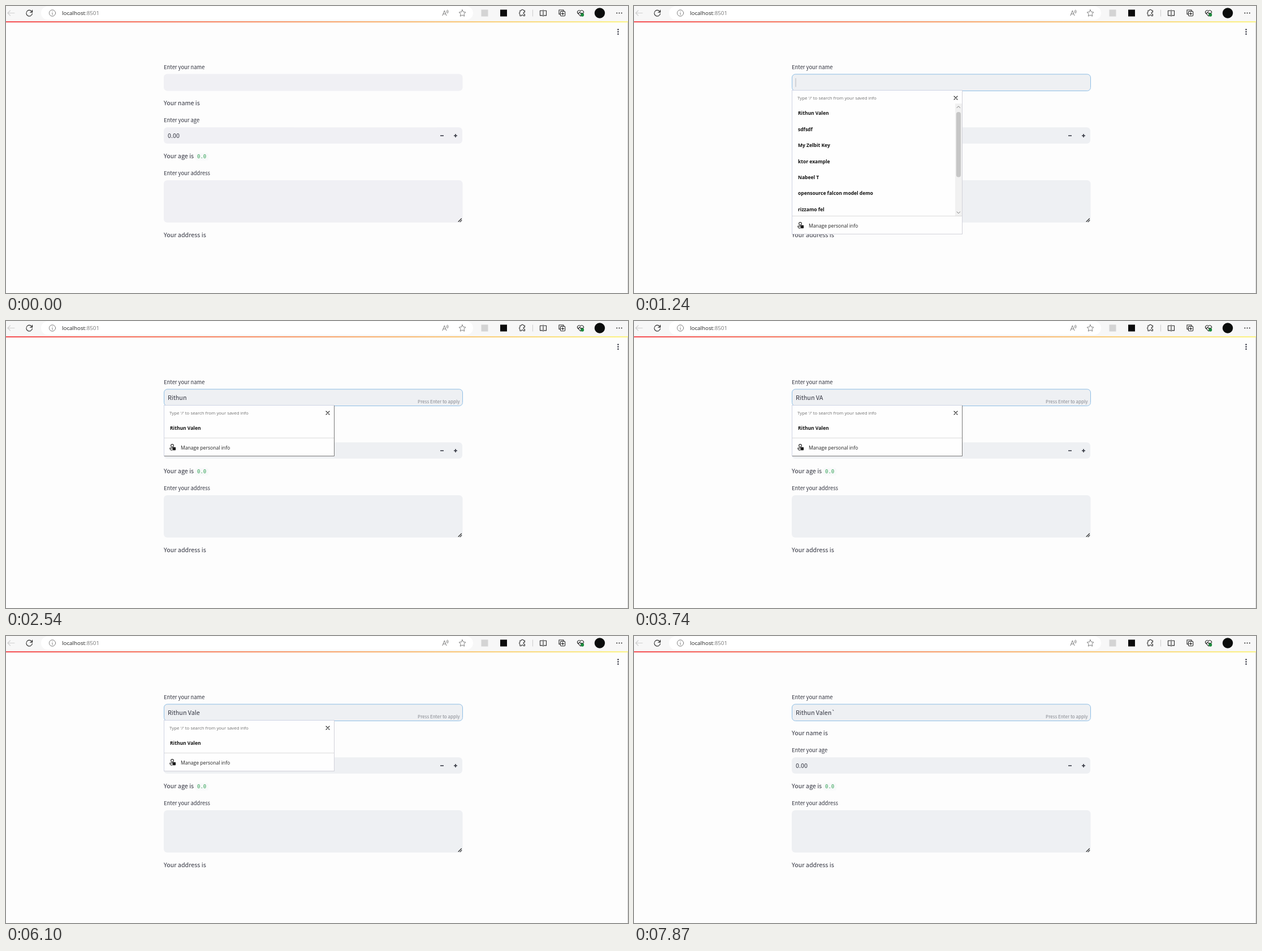
An HTML page that plays this animation: 1100x509 px, repeating every 8 s.

```html
<!DOCTYPE html>
<html lang="en">
<head>
<meta charset="utf-8">
<title>Form demo</title>
<style>
  html, body { margin: 0; width: 100%; height: 100%; overflow: hidden; background: #fdfdfd; }
  svg { display: block; width: 1100px; height: 509px; }
  text { white-space: pre; }

  .form { font-family: "Noto Sans CJK JP", "Noto Sans CJK SC", "Noto Sans CJK", "Noto Sans", sans-serif; fill: #31333f; }
  .body { font-size: 10.75px; }
  .label { font-size: 9.4px; }
  .hint { font-size: 8.05px; fill: #85878e; }
  .code { font: 9px "DejaVu Sans Mono", monospace; fill: #2c9f50; }
  .ui { font-family: "Open Sans", "Noto Sans", sans-serif; font-size: 8.6px; fill: #222; }
  .url { font-size: 9.8px; }
  .tip { font-size: 7.86px; fill: #707070; }
  .item { font-size: 8.5px; font-weight: 700; fill: #111; }

  .line { fill: none; stroke: #2b2b2b; stroke-width: 1.1; stroke-linecap: round; stroke-linejoin: round; }
  .faint { stroke: #cfcfcf; }
  .grey { stroke: #707070; stroke-width: .9; }

  .field { animation: tint 8s linear infinite; }
  #ring { fill: none; stroke: #8fbfe6; animation: focus 8s linear infinite; }
  #edge { fill: none; animation: edge 8s step-end infinite; }
  #caret { animation: blink 8s linear infinite; }

  @keyframes tint { 0%, .5% { fill: #f0f0f4; } 3%, 100% { fill: #eef0f3; } }
  @keyframes focus { 0%, 7.9% { opacity: 0; } 8.3% { opacity: .55; } 11.25%, 100% { opacity: 1; } }
  @keyframes edge { 0% { stroke: #d2d2da; } 20.5% { stroke: #777; } 76.25%, 100% { stroke: #d2d2da; } }
  @keyframes blink {
    0%, 7.9%, 15.9%, 16.7%, 31.75%, 35.5%, 41.7%, 42%, 46.7%, 50.5%, 57.1%, 57.4%,
    62.1%, 64.25%, 72.1%, 76.25%, 82.4%, 85%, 92.5%, 100% { opacity: 0; }
    8%, 14.6%, 16.75%, 30.5%, 36.75%, 40.5%, 42.1%, 45.5%, 51.75%, 55.9%, 58.75%,
    60.9%, 65.5%, 70.9%, 77.5%, 81.25%, 86.25%, 91.25% { opacity: 1; }
  }
</style>
</head>
<body>
<svg viewBox="0 0 1100 509">
  <defs>
    <linearGradient id="bar">
      <stop stop-color="#f5565a"/>
      <stop offset="1" stop-color="#fbf48a"/>
    </linearGradient>
  </defs>

  <!-- browser toolbar -->
  <rect width="1100" height="27" fill="#f7f7f7"/>
  <rect x="62" y="0.5" width="764" height="24" rx="12" fill="#fff"/>
  <path class="line faint" d="M15 12.5H3M7.5 8 3 12.5 7.5 17"/>
  <path class="line" d="M46.2 11a5.3 5.3 0 1 0 .2 2.6M46.6 7.2v3.9h-3.9"/>
  <circle class="line grey" cx="82" cy="12.5" r="5.6"/>
  <path class="line grey" d="M82 12v3.4M82 9.7v.1"/>
  <text class="ui url" x="99" y="16">localhost<tspan fill="#777">:8501</tspan></text>
  <path class="line grey" d="M772 17l3.4-9 3.4 9M773.2 14h4.4M779.2 8.2q1.6 1.6 0 3.6M781 7q2.6 2.8 0 6"/>
  <path class="line grey" d="M807 6.8l1.8 3.8 4.1.5-3 2.9.8 4.1-3.7-2-3.7 2 .8-4.1-3-2.9 4.1-.5z"/>
  <rect x="840.5" y="6.5" width="12" height="12" fill="#d4d4d4"/>
  <rect x="874" y="6.5" width="12" height="12" fill="#0b0b0b"/>
  <path class="line" d="M909 8h2.4a1.8 1.8 0 0 1 3.6 0h2.4v3a1.8 1.8 0 1 0 0 3.4v3.1H915a1.8 1.8 0 0 0-3.6 0H909v-3.1a1.8 1.8 0 0 1 0-3.4z"/>
  <path class="line faint" d="M931.5 7v11"/>
  <path class="line" d="M948.5 8.3h-4v8.6h4M951.5 8.3h4v8.6h-4M950 7v11.3"/>
  <path class="line" d="M986 8.4V7h-8v7.4h1.8"/>
  <rect class="line" x="980.5" y="9.4" width="8.2" height="8.4" rx="1.6"/>
  <path class="line" d="M984.6 11.4v4.4M982.4 13.6h4.4"/>
  <path class="line" d="M1016 17.8l-4.8-4.9a3 3 0 0 1 4.8-3.8 3 3 0 0 1 4.8 3.8zM1010.8 12.6h2.6l1.4-2 1.8 3.4 1-1.4h2"/>
  <circle cx="1019.2" cy="15.8" r="3" fill="#1c8a3c"/>
  <circle cx="1050" cy="12.5" r="9.2" fill="#0b0d0c"/>
  <g fill="#222">
    <circle cx="1080.3" cy="12.5" r="1"/><circle cx="1084.5" cy="12.5" r="1"/><circle cx="1088.7" cy="12.5" r="1"/>
  </g>

  <!-- page -->
  <rect y="27" width="1100" height="2.2" fill="url(#bar)"/>
  <path d="M1099.5 29v480" stroke="#d8d8d8"/>
  <g fill="#31333f">
    <circle cx="1082.5" cy="41.8" r="1.3"/><circle cx="1082.5" cy="45.8" r="1.3"/><circle cx="1082.5" cy="49.8" r="1.3"/>
  </g>

  <g class="field">
    <rect x="279" y="120.5" width="528.5" height="30" rx="6"/>
    <rect x="279" y="215.3" width="528" height="28.7" rx="6"/>
    <rect x="279" y="309" width="528.5" height="75" rx="6"/>
  </g>
  <rect id="ring" x="279.5" y="121" width="528" height="29.5" rx="6"/>
  <path d="M768 230h6M792 230h6M795 227v6" stroke="#31333f" stroke-width="1.6"/>
  <path class="line" d="M800 382.5l5.5-5.5M803 382.8l2.8-2.8"/>
  <rect x="335" y="260.5" width="23" height="13.5" rx="3" fill="#f8f9fa"/>

  <g class="form">
    <g class="label">
      <text x="279" y="112">Enter your name</text>
      <text x="279" y="206.2">Enter your age</text>
      <text x="279" y="300.2">Enter your address</text>
    </g>
    <g class="body">
      <text x="279" y="176.3">Your name is</text>
      <text x="286" y="234">0.00</text>
      <text x="279" y="270.3">Your age is</text>
      <text x="279" y="410">Your address is</text>
      <text id="typed" x="286" y="139.6"></text>
    </g>
    <text id="apply" class="hint" x="802.5" y="146.2" text-anchor="end">Press Enter to apply</text>
    <text class="code" x="338" y="270.4">0.0</text>
  </g>
  <rect id="caret" y="128" width="1" height="15.5" fill="#31333f"/>

  <!-- autofill popup -->
  <g id="popup" class="ui">
    <rect id="panel" x="279.5" y="149.5" width="301" fill="#fefefe" stroke="#cfd4e4"/>
    <path id="edge"/>
    <text class="tip" x="289" y="166">Type '/' to search from your saved info</text>
    <path class="line" d="M566 160l6 6M572 160l-6 6"/>
    <g id="items"></g>
    <g id="scroll">
      <rect x="568" y="173" width="12" height="200" fill="#f1f1f1"/>
      <rect x="569.8" y="188" width="8.2" height="115.5" rx="4" fill="#c6c6c6"/>
      <path class="line grey" d="M571 180.5l2.8-2.8 2.8 2.8M571 365l2.8 2.8 2.8-2.8"/>
    </g>
    <g id="footer">
      <path d="M280 0H580" stroke="#dadada"/>
      <circle class="line" cx="294" cy="13.5" r="2.4"/>
      <path class="line" d="M294 21.5c-3 0-4.2-1.2-4.2-3.6h4.2"/>
      <rect x="294.5" y="16.2" width="5.6" height="5.6" rx="1" fill="#1b1b1b"/>
      <text x="309" y="20">Manage personal info</text>
    </g>
  </g>
</svg>

<script>
  const $ = id => document.getElementById(id);
  const LOOP = 8000;
  const OPEN = 650, CLOSE = 7770;

  const saved = [
    "Rithun Valen", "sdfsdf", "My Zelbit Key", "ktor example",
    "Nabeel T", "opensource falcon model demo", "rizzamo fel"
  ];

  // [time, field value from then on]
  const keys = [
    [0, ""], [1340, "R"], [1640, "Ri"], [1840, "Rit"], [1950, "Rith"], [2050, "Rithu"],
    [2160, "Rithun"], [2270, "Rithun "], [3370, "Rithun V"], [3470, "Rithun VA"],
    [4170, "Rithun V"], [4570, "Rithun Va"], [4700, "Rithun Val"], [5240, "Rithun Vale"],
    [6900, "Rithun Valen"], [CLOSE, "Rithun Valen`"]
  ];

  const valueAt = t => keys.filter(([at]) => at <= t).pop()[1];
  const matches = value => saved.filter(s => s.toLowerCase().startsWith(value.toLowerCase()));

  function showPopup(names) {
    const line = 179.5 + 28.4 * names.length - (names.length === saved.length ? 5 : 0);
    const bottom = Math.round(line) + 31.5;
    $("items").innerHTML = names.map((name, i) =>
      `<text class="item" x="290" y="${193.2 + 28.45 * i}">${name}</text>`).join("");
    $("panel").setAttribute("height", bottom - 149.5);
    $("edge").setAttribute("d", `M580.5 150V${bottom}H280`);
    $("footer").setAttribute("transform", `translate(0 ${Math.round(line) - .5})`);
    $("scroll").style.display = names.length === saved.length ? "" : "none";
  }

  let shown = null;
  function setValue(value) {
    if (value === shown) return;
    shown = value;
    const typed = $("typed");
    typed.textContent = value;
    $("caret").setAttribute("x", 285.5 + (value ? typed.getComputedTextLength() : 0));
    $("apply").style.display = value ? "" : "none";
    showPopup(matches(value));
  }

  function draw(now) {
    const t = now % LOOP;
    setValue(valueAt(t));
    $("popup").style.display = t >= OPEN && t < CLOSE ? "" : "none";
    requestAnimationFrame(draw);
  }
  draw(performance.now());
</script>
</body>
</html>
```
